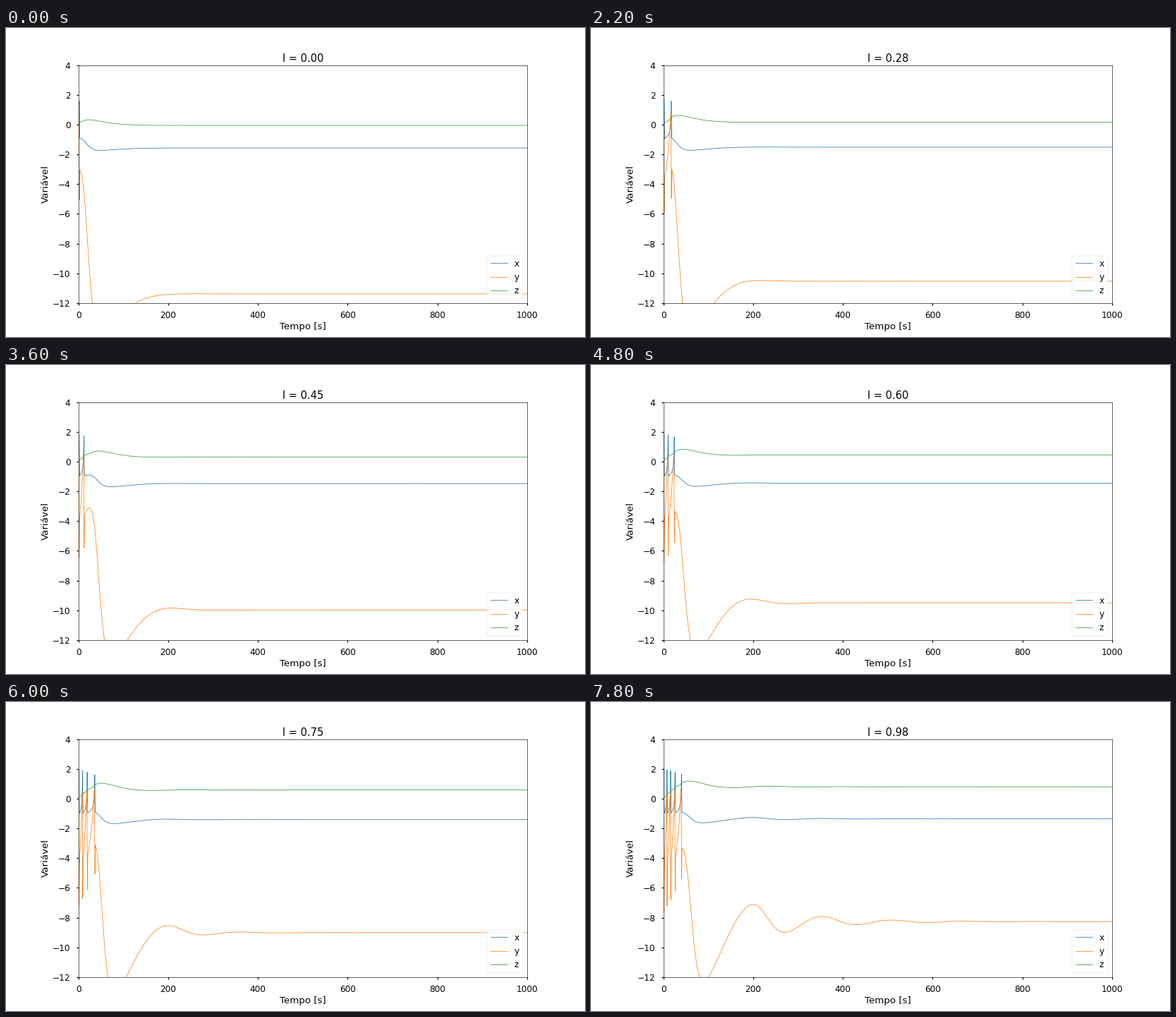
Write a matplotlib script that moves like this. It is 821x438 px and loops after 8000 ms.

```python
import numpy as np
import matplotlib.pyplot as plt
from matplotlib.animation import FuncAnimation

# Hindmarsh-Rose neuron, swept over the injected current
FRAMES, INTERVAL = 40, 200
R, S, X_REST = 0.006, 4.0, -1.56
T_END, DT = 1000, 0.05
DPI = 64
K = 54.75 / DPI  # style sizes below are for 54.75 dpi

currents = np.arange(FRAMES) * 0.025


def slope(state):
    x, y, z = state
    x2 = x * x
    out = np.empty_like(state)
    out[0] = y + x2 * (3 - x) - z + currents
    out[1] = 1 - 5 * x2 - y
    out[2] = R * (S * (x - X_REST) - z)
    return out


def integrate():
    """Runge-Kutta for all currents at once; result is (time, variable, current)."""
    steps = round(T_END / DT)
    path = np.zeros((steps + 1, 3, FRAMES))
    for n in range(steps):
        s = path[n]
        k1 = slope(s)
        k2 = slope(s + DT / 2 * k1)
        k3 = slope(s + DT / 2 * k2)
        k4 = slope(s + DT * k3)
        path[n + 1] = s + DT / 6 * (k1 + 2 * (k2 + k3) + k4)
    return np.linspace(0, T_END, steps + 1), path


time, path = integrate()

plt.rcParams.update({
    "font.family": "DejaVu Sans",
    "axes.titlesize": 19.2 * K,
    "axes.titlepad": 6 * K,
    "axes.labelsize": 17.6 * K,
    "axes.labelpad": 4 * K,
    "axes.linewidth": 0.8 * K,
    "legend.fontsize": 16 * K,
    "patch.linewidth": 0.48 * K,
    "lines.linewidth": 1.0 * K,
})
for axis in ("xtick", "ytick"):
    plt.rcParams.update({
        f"{axis}.labelsize": 16 * K,
        f"{axis}.major.size": 3.5 * K,
        f"{axis}.major.width": 1.6 * K,
        f"{axis}.major.pad": 11.2 * K,
    })

fig, ax = plt.subplots(figsize=(821 / DPI, 438 / DPI), dpi=DPI)
fig.subplots_adjust(left=0.125, right=0.9, bottom=0.11, top=0.88)
lines = [ax.plot([], [], color=c, label=name)[0]
         for name, c in zip("xyz", ("tab:blue", "tab:orange", "tab:green"))]
ax.set(xlim=(0, T_END), ylim=(-12, 4), xlabel="Tempo [s]", ylabel="Variável",
       xticks=range(0, T_END + 1, 200), yticks=range(-12, 5, 2))
ax.legend(loc="lower right")
title = ax.set_title("")


def update(frame):
    for i, line in enumerate(lines):
        line.set_data(time, path[:, i, frame])
    title.set_text(f"I = {currents[frame]:.2f}")
    return [*lines, title]


anim = FuncAnimation(fig, update, frames=FRAMES, interval=INTERVAL,
                     repeat=True, repeat_delay=0)
plt.show()
```
